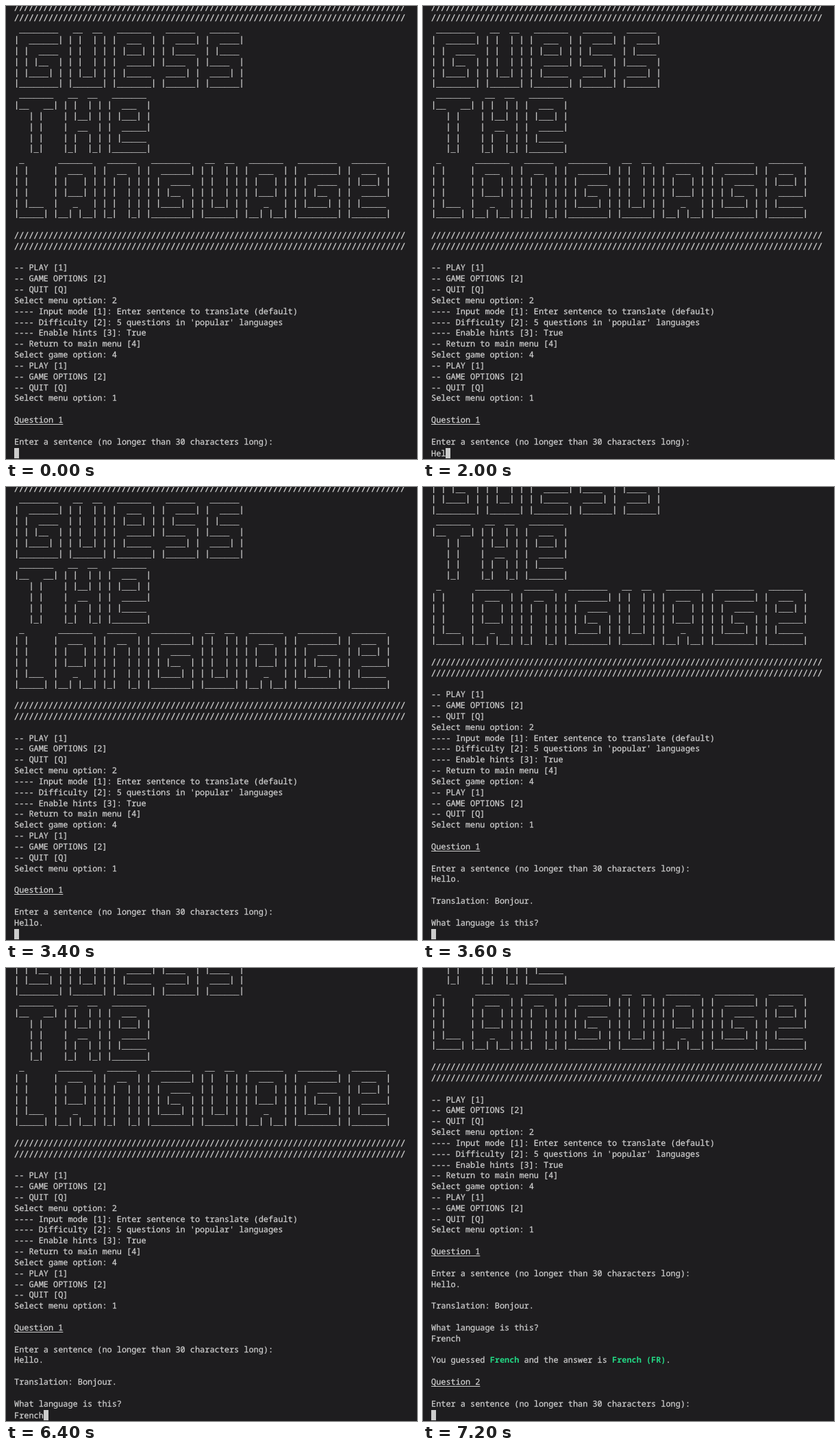
Animation, 600 px wide and 660 px high, one loop 8 s. Source, as an HTML page:

```html
<!DOCTYPE html>
<html lang="en">
<head>
<meta charset="utf-8">
<title>Guess the Language</title>
<style>
  html, body { margin: 0; width: 100%; height: 100%; overflow: hidden; background: #1e1d1f; }
  #stage { position: absolute; left: 0; top: 0; width: 600px; height: 660px; overflow: hidden; }
  pre {
    position: absolute; left: 12px; bottom: -0.4px; margin: 0;
    font: 11.9px/15.83px "Noto Sans Mono", "Liberation Mono", monospace;
    text-rendering: geometricPrecision;
    font-variant-ligatures: none;
    color: #d0d0d0;
    -webkit-text-stroke: 0.25px;
  }
  /* Taller bars and lower underscores for the banner */
  span { font: 11.86px/0 "DejaVu Sans Mono", monospace; }
  u { text-underline-offset: 2px; text-decoration-thickness: 1px; text-decoration-skip-ink: none; }
  b { color: #23d985; -webkit-text-stroke: 0; }
  i { display: inline-block; width: 7px; height: 15px; vertical-align: -3px; background: #ccc; }
</style>
</head>
<body>
<div id="stage"><pre id="terminal"></pre></div>
<script>
const LOOP = 8000;

// Banner letters, six rows each
const letters = {
  G: [' ________ ', '|  ______|', '| |  ____ ', '| | |__  |', '| |____| |', '|________|'],
  U: [' __  __ ', '| |  | |', '| |  | |', '| |  | |', '| |__| |', '|______|'],
  E: [' _______ ', '|  ___  |', '| |___| |', '|  _____|', '| |_____ ', '|_______|'],
  S: [' ______ ', '|  ____|', '| |____ ', '|____  |', ' ____| |', '|______|'],
  T: [' _______ ', '|__   __|', '   | |   ', '   | |   ', '   | |   ', '   |_|   '],
  H: [' __  __ ', '| |  | |', '| |__| |', '|  __  |', '| |  | |', '|_|  |_|'],
  L: [' _     ', '| |    ', '| |    ', '| |    ', '| |___ ', '|_____|'],
  A: [' _______ ', '|  ___  |', '| |   | |', '| |___| |', '|   _   |', '|__| |__|'],
  N: [' ______ ', '|  __  |', '| |  | |', '| |  | |', '| |  | |', '|_|  |_|'],
};
const banner = word => letters.G.map((_, row) => [...word].map(c => letters[c][row]).join(' ')).join('\n');

const slashes = '/'.repeat(80);
const menu = `-- PLAY [1]
-- GAME OPTIONS [2]
-- QUIT [Q]
Select menu option: `;
const ask = n => `\n<u>Question ${n}</u>\n\nEnter a sentence (no longer than 30 characters long):\n`;

const intro = `<span>${slashes}
${slashes}
${['GUESS', 'THE', 'LANGUAGE'].map(banner).join('\n')}

${slashes}
${slashes}</span>

${menu}2
---- Input mode [1]: Enter sentence to translate (default)
---- Difficulty [2]: 5 questions in 'popular' languages
---- Enable hints [3]: True
-- Return to main menu [4]
Select game option: 4
${menu}1
${ask(1)}`;
const translation = '\nTranslation: Bonjour.\n\nWhat language is this?\n';
const result = '\nYou guessed <b>French</b> and the answer is <b>French (FR)</b>.\n';

// Output appears at a given time; typed text has one time per key
const print = (at, text) => ({ times: [at], parts: [text] });
const type = (text, times) => ({ times, parts: [...text] });
const script = [
  print(0, intro),
  type('Hello.', [1600, 1800, 2000, 2200, 2600, 2800]),
  print(3400, '\n'),
  print(3600, translation),
  type('French', [5000, 5200, 5400, 6000, 6200, 6400]),
  print(6800, '\n' + result + ask(2)),
];

const terminal = document.getElementById('terminal');
let shown = '';

function draw(now) {
  const t = now % LOOP;
  const text = script.map(({ times, parts }) => parts.filter((_, k) => t >= times[k]).join('')).join('');
  if (text !== shown) {
    shown = text;
    terminal.innerHTML = text + '<i></i>';
  }
}

const start = performance.now();
(function tick() {
  draw(Math.max(0, performance.now() - start));
  requestAnimationFrame(tick);
})();
</script>
</body>
</html>
```
